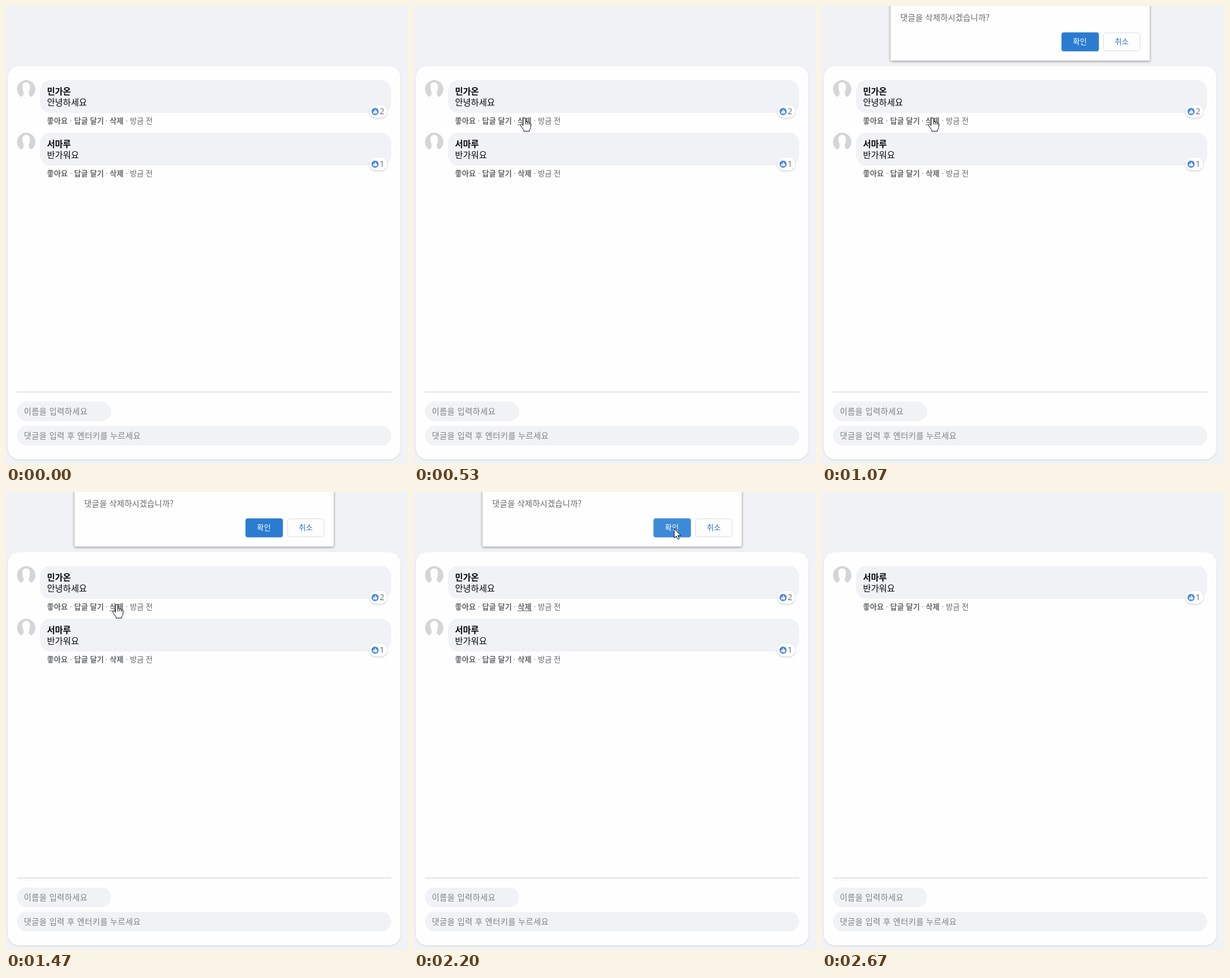
An HTML page that plays this animation: 696 by 792 pixels, repeating every 3.66 s.

```html
<!DOCTYPE html>
<html lang="ko">
<head>
<meta charset="utf-8">
<title>댓글</title>
<style>
  html, body { margin: 0; height: 100%; overflow: hidden; background: #f0f2f5; }
  svg { display: block; width: 696px; height: 792px; }
  text { font: 13px "Noto Sans CJK KR", "Noto Sans CJK", "Noto Sans", sans-serif; fill: #65676b; }
  .name, .body { font-size: 15px; fill: #050505; }
  .name, .link { font-weight: 700; }
  .soft { fill: #f0f2f5; }
  .card { fill: #fefefe; }
  .hint { font-size: 14px; letter-spacing: .35px; fill: #808080; }
  .ask { font-size: 14px; letter-spacing: .2px; }
  .count { font: 14px "Open Sans", "Noto Sans", sans-serif; }
  .panel { filter: drop-shadow(0 1px 1px #d0d0d0); }
  .pill { filter: drop-shadow(0 1px 1px #c4c4c4); }
  .box { filter: drop-shadow(0 1px 2px #808080); }
  .pointer path { fill: #fff; stroke: #111; stroke-linejoin: round; }
</style>
</head>
<body>
<svg viewBox="0 0 696 792">
  <rect class="soft" width="696" height="792"/>
  <rect class="card panel" x="3" y="104" width="680" height="680" rx="20"/>
  <g id="list"></g>
  <path d="M19 667.5H667" stroke="#ccc"/>
  <rect class="soft" x="19" y="684" width="163" height="34" rx="17"/>
  <text class="hint" x="31" y="706">이름을 입력하세요</text>
  <rect class="soft" x="19" y="726" width="648" height="34" rx="17"/>
  <text class="hint" x="31" y="748">댓글을 입력 후 엔터키를 누르세요</text>

  <g id="dialog">
    <rect class="card box" x="118.5" y="-60" width="449" height="154.5" rx="2"/>
    <text class="ask" x="135.5" y="25">댓글을 삭제하시겠습니까?</text>
    <rect id="ok" x="414.5" y="45.5" width="65" height="33" rx="4" stroke="#a9c6ea"/>
    <text x="434.5" y="66" style="fill:#fff">확인</text>
    <rect class="card" x="487.5" y="46.5" width="63" height="31" rx="4" stroke="#dadce0"/>
    <text x="507" y="66" style="fill:#2a70c8">취소</text>
  </g>

  <g id="pointer" class="pointer">
    <path id="arrow" d="M.5 .5V16.5L4.2 13L6.7 18.8L9.3 17.7L6.9 12H12Z"/>
    <g id="hand">
      <path d="M-2 1.2Q-2-.7 0-.7T2 1.2V6.2Q4.2 5.2 5.2 7Q7.4 6.2 8.3 8Q11 7.6 11 10V15Q11 18 9 20V22.5H-1V20.5L-6.3 13Q-7.4 10.8-5.6 10.2Q-4.2 9.9-2 12.6Z"/>
      <path d="M2 6.2V11M5.2 7.2V11M8.3 8.2V11.5" style="fill:none"/>
    </g>
  </g>
</svg>
<script>
const LOOP = 3660;
const $ = id => document.getElementById(id);

const comment = (id, name, body, likes) => `
  <g id="${id}">
    <clipPath id="${id}-clip"><circle cx="35" cy="144" r="16"/></clipPath>
    <g clip-path="url(#${id}-clip)">
      <circle cx="35" cy="144" r="16" fill="#d4d5d8"/>
      <path class="card" d="M35 132C40 132 42 136 41.5 141Q41 146 39.5 149V153Q41 156 46 158V161H24V158Q29 156 30.5 153V149Q29 146 28.5 141C28 136 30 132 35 132Z"/>
    </g>
    <rect class="soft" x="59" y="128" width="608" height="57" rx="18"/>
    <text class="name" x="71" y="153">${name}</text>
    <text class="body" x="71" y="172">${body}</text>
    <text class="link" x="71" y="203">좋아요</text>
    <text class="link" x="118" y="203">답글 달기</text>
    <text class="link" x="179.5" y="203">삭제</text>
    <text x="214.5" y="203">방금 전</text>
    ${[112.5, 174, 209].map(x => `<circle cx="${x}" cy="198.5" r=".8" fill="#65676b"/>`).join("")}
    <rect class="card pill" x="629" y="171" width="31" height="22.5" rx="11.25"/>
    <circle cx="639" cy="182.5" r="6.2" fill="#4a88e0"/>
    <path d="M635.6 182H637.2V186H635.6ZM637.8 182L639.2 179Q640.8 179 640.2 181.4H642.4Q643 183.5 641.8 186H637.8Z" fill="#fff"/>
    <text class="count" x="647" y="187">${likes}</text>
  </g>`;

$("list").innerHTML =
  comment("first", "민가온", "안녕하세요", 2) +
  comment("second", "서마루", "반가워요", 1) +
  `<path id="under" d="M179.5 205.5H204" stroke="#65676b"/>`;

const span = (t, from, to) => Math.min(1, Math.max(0, (t - from) / (to - from)));
const smooth = u => u * u * (3 - 2 * u);
const show = (id, on) => $(id).setAttribute("visibility", on ? "visible" : "hidden");
const shift = (id, x, y) => $(id).setAttribute("transform", `translate(${x} ${y})`);
const bezier = (u, a, b, c, d) =>
  a * (1 - u) ** 3 + 3 * b * u * (1 - u) ** 2 + 3 * c * u * u * (1 - u) + d * u ** 3;

// Pointer strokes: up to the link, over to the button, out at the top.
const strokes = [
  { from: 60, to: 470, x: [150, 150, 185, 191], y: [800, 560, 260, 194] },
  { from: 1450, to: 1900, x: [191, 215, 300, 450], y: [194, 275, 270, 63] },
  { from: 2400, to: 2640, x: [450, 450, 452, 456], y: [63, 50, 10, -30] }
];

function draw(t) {
  const stroke = strokes.filter(s => t >= s.from).pop() || strokes[0];
  const u = smooth(span(t, stroke.from, stroke.to));
  shift("pointer", bezier(u, ...stroke.x), bezier(u, ...stroke.y));
  const onLink = t >= 440 && t < 1480;
  show("hand", onLink);
  show("arrow", !onLink);

  const deleted = t >= 2250;
  show("first", !deleted);
  show("under", t >= 440 && !deleted);
  shift("second", 0, deleted ? 0 : 91);

  const fade = (span(t, 870, 1030) - span(t, 2260, 2415)) ** 2;
  $("dialog").setAttribute("opacity", fade);
  shift("dialog", 0, -17 * (1 - fade * fade));
  $("ok").setAttribute("fill", t < 1860 ? "#2a7cd0" : "#3c8ad8");
}

function tick() {
  draw(performance.now() % LOOP);
  requestAnimationFrame(tick);
}
tick();
</script>
</body>
</html>
```
